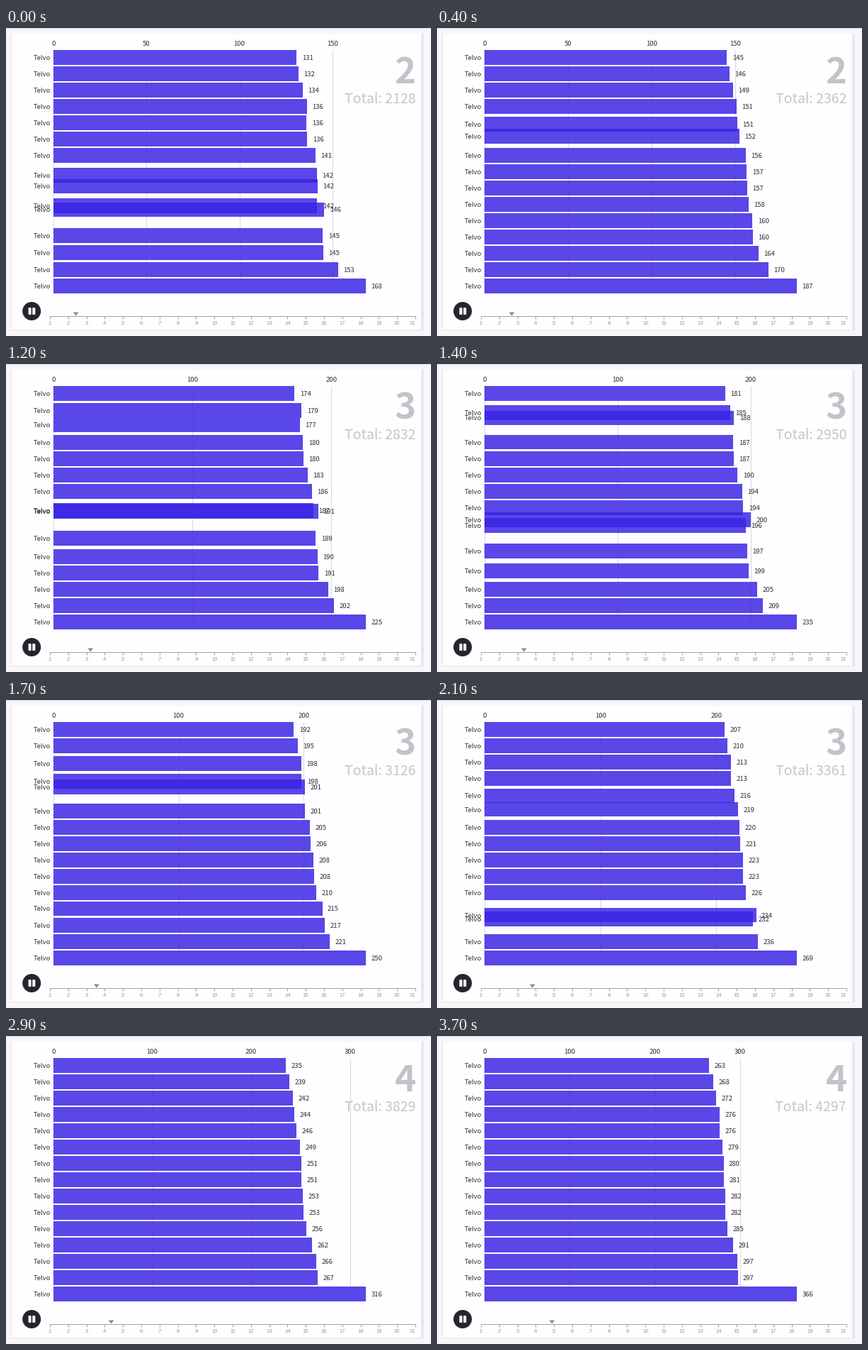
A matplotlib script for the animation above (3.8 s loop, 600 by 434 pixels).

```python
import numpy as np
import matplotlib.pyplot as plt
from matplotlib.animation import FuncAnimation
from matplotlib.patches import Circle, FancyBboxPatch, Polygon, Rectangle

W, H, DPI = 600, 434, 100
FRAMES, INTERVAL = 38, 100
FRAMES_PER_UNIT = 15
START = 2.42                      # moment on the timeline when the loop begins

LEFT, FULL = 67, 441              # bar origin and width of the leading bar
TOP, BOTTOM = 31, 373.5
PITCH = (BOTTOM - TOP) / 14.9
BAR = 0.9 * PITCH
SANS, LABEL_PX = "Noto Sans CJK JP", 9.5
INK, NAME = "#303036", "Telvo"
SWAP = 5                          # frames a bar takes to change place

# Values at the moments in KNOTS, listed in order of rank at the start.
KNOTS = [START, 3, 4, 5]
SERIES = np.array([
    [130.7, 161.4, 216.8, 269.4],
    [131.6, 163.9, 230.9, 287.3],
    [134.0, 165.7, 219.25, 274.6],
    [136.0, 167.7, 222.5, 278.3],
    [136.3, 170.9, 225.65, 282.6],
    [136.4, 168.1, 222.6, 282.4],
    [140.9, 173.9, 229.85, 285.3],
    [141.6, 174.5, 247.4, 303.3],
    [141.8, 174.6, 230.8, 286.7],
    [142.0, 176.4, 232.95, 288.4],
    [144.8, 178.1, 233.0, 288.7],
    [144.9, 178.2, 236.1, 291.4],
    [145.6, 185.2, 241.9, 297.6],
    [153.0, 189.4, 245.95, 303.2],
    [167.9, 208.6, 282.7, 377.0],
])
TOTAL = [2127.6, 2638.5, 3519.3, 4396]
COUNT = len(SERIES)

# Bars already changing place when the loop begins: row -> (from slot, since frame)
MOVING = {3: (4, -.5), 4: (3, -.5), 7: (8, -3.1), 8: (9.96, -2.4),
          9: (7.04, -2.4), 10: (11, -1.4), 11: (12, -1), 12: (9.25, -1)}


def moment(frame):
    return START + frame / FRAMES_PER_UNIT


def values(frame):
    return np.array([np.interp(moment(frame), KNOTS, row) for row in SERIES])


def ease(u):
    u = np.clip(u, 0, 1)
    return np.where(u < .5, 4 * u ** 3, 1 - 4 * (1 - u) ** 3)


def slot_paths(substeps=10):
    """Slot of every bar per frame; a change of rank restarts its easing."""
    target = np.arange(COUNT)
    origin = target.astype(float)
    since = np.full(COUNT, -99.0)
    for row, (slot, began) in MOVING.items():
        origin[row], since[row] = slot, began
    slot, path = origin.copy(), []
    for n in range(FRAMES * substeps):
        now = n / substeps
        rank = np.argsort(np.argsort(values(now), kind="stable"))
        changed = rank != target
        origin[changed], since[changed] = slot[changed], now
        target = rank
        slot = origin + (target - origin) * ease((now - since) / SWAP)
        if n % substeps == 0:
            path.append(slot)
    return path


def tick_step(top, count=3):
    raw = top / count
    power = 10 ** np.floor(np.log10(raw))
    ratio = raw / power
    factor = 10 if ratio >= 50 ** .5 else 5 if ratio >= 10 ** .5 else 2
    return int(power * (factor if ratio >= 2 ** .5 else 1))


fig = plt.figure(figsize=(W / DPI, H / DPI), dpi=DPI, facecolor="#f7f6f8")
ax = fig.add_axes([0, 0, 1, 1])
ax.set(xlim=(0, W), ylim=(H, 0))
ax.axis("off")


def text(x, y, s="", px=LABEL_PX, color=INK, family=SANS, **kw):
    return ax.text(x, y, s, fontsize=px * 72 / DPI, color=color,
                   family=family, va="baseline", **kw)


def line(xs, ys, color, z=1):
    return ax.plot(xs, ys, color=color, lw=72 / DPI, zorder=z,
                   solid_capstyle="butt")[0]


def box(x, y, w, h, color, **kw):
    return ax.add_patch(Rectangle((x, y), w, h, fc=color, lw=0, **kw))


# Page and card
box(0, 0, W, 1, "#d9d7dc", zorder=0)
box(7, 8, 580, 418, "#e6e4ea", zorder=0)
box(586, 8, 4, 418, "#e9e7ed", zorder=0)
box(8, 8, 578, 417, "#fefdff", zorder=0)

# Pause button
ax.add_patch(Circle((36.2, 399), 13, fc="#27252b", lw=0))
for x in (31.6, 37.3):
    ax.add_patch(FancyBboxPatch((x + 1, 395), 2, 8, fc="white", lw=0,
                                boxstyle="round,pad=1,rounding_size=1", zorder=3))

# Timeline
AXIS_X, UNIT, AXIS_Y = 62, 25.8, 405.5
line([AXIS_X, AXIS_X + 20 * UNIT], [AXIS_Y] * 2, "#a3a3a6")
for i in range(21):
    x = AXIS_X + i * UNIT
    line([x, x], [AXIS_Y, AXIS_Y + 4.5], "#a3a3a6")
    last = i == 20
    text(x + .5 * last, 417.5, str(i + 1), 7.6, "#98989b", "Liberation Sans",
         ha="right" if last else "center")
marker = ax.add_patch(Polygon([(0, 0)] * 3, fc="#8c8c90", lw=0, zorder=4))

# Value axis
grid = [(line([0, 0], [TOP, BOTTOM], "#d9d8de"), text(0, 25, ha="center"))
        for _ in range(6)]

# Bars with their labels
bars = []
for row in range(COUNT):
    z = 10 + row
    bars.append((box(LEFT, 0, 0, BAR, (57 / 255, 36 / 255, 228 / 255),
                     alpha=.84, zorder=z),
                 text(63, 0, NAME, ha="right", zorder=z + .5),
                 text(0, 0, zorder=z + .5)))

unit_text = text(578.5, 78, px=51, color="#c3c2c6", ha="right", weight="bold")
total_text = text(578, 106.5, px=19.5, color="#c6c5c9", ha="right")

PATHS = slot_paths()


def draw(frame):
    now, vals = moment(frame), values(frame)
    top = vals.max()
    scale = FULL / top

    step = tick_step(top)
    for i, (rule, label) in enumerate(grid):
        x = LEFT + i * step * scale
        rule.set_xdata([x, x])
        label.set_x(x)
        label.set_text(str(i * step))
        for artist in (rule, label):
            artist.set_visible(i * step <= top)

    for (bar, name, number), value, slot in zip(bars, vals, PATHS[frame]):
        y = TOP + slot * PITCH
        bar.set_y(y)
        bar.set_width(value * scale)
        name.set_y(y + BAR / 2 + 3.4)
        number.set_position((LEFT + value * scale + 7.5, y + BAR / 2 + 3.4))
        number.set_text(f"{value:.0f}")

    x = AXIS_X + (now - 1) * UNIT
    marker.set_xy([(x - 4, 400.5), (x + 4, 400.5), (x, 405.5)])
    unit_text.set_text(str(int(now)))
    total_text.set_text(f"Total: {np.interp(now, KNOTS, TOTAL):.0f}")
    return []


anim = FuncAnimation(fig, draw, frames=FRAMES, interval=INTERVAL,
                     init_func=lambda: draw(0), repeat=True, repeat_delay=0)
plt.show()
```
